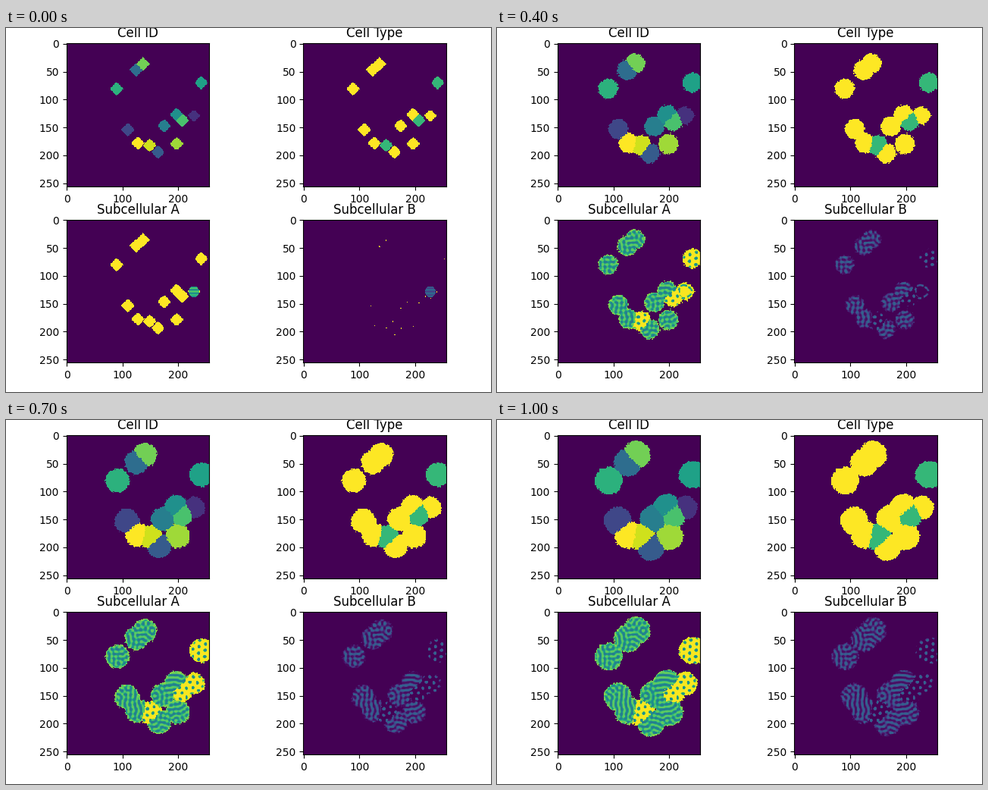
A matplotlib script that plays this animation: 640x480 px, repeating every 1100 ms.

```python
import numpy as np
import matplotlib.pyplot as plt
from matplotlib.animation import FuncAnimation

N = 256
STEPS = 11

# start x, start y, end x, end y; row order gives the cell id
CELLS = np.array([
    (227, 129, 228, 129), (109, 154, 107, 152.5), (163, 194, 166, 199),
    (124, 47, 125, 48.5), (174, 147, 171, 150), (196, 127, 195, 129),
    (240, 70, 241, 70), (89, 81, 91, 80.5), (206, 137, 205, 141),
    (136, 37, 140.5, 34), (196, 179, 199.5, 180), (148, 182, 150, 182),
    (127, 178, 125, 177)])
GREEN_TYPE = (7, 9, 12)
SPOTTED = (1,) + GREEN_TYPE

yy, xx = np.mgrid[:N, :N].astype(float)


def ring_filter(wave):
    freq = np.hypot(np.fft.fftfreq(N)[:, None], np.fft.fftfreq(N)[None, :])
    return np.exp(-((freq * wave - 1) / 0.24) ** 2)


MAZE, DOTS = ring_filter(8.5), ring_filter(10.5)


def band(u, ring):
    """Keep one wavelength and scale to unit deviation."""
    v = np.fft.ifft2(np.fft.fft2(u) * ring).real
    return v / v.std()


def relax(u, ring, bias, rounds):
    for _ in range(rounds):
        u = np.tanh(2 * (band(u, ring) - bias))
    return u


def soft_noise(rng):
    n = rng.standard_normal((N, N))
    n = n + np.roll(n, 1, 0) + np.roll(n, -1, 0)
    return (n + np.roll(n, 1, 1) + np.roll(n, -1, 1)) / 9


def radii(k):
    r = np.full(len(CELLS), np.sqrt(138 + 47.5 * k))
    r[0] = np.sqrt(115 + 35 * k)
    return r


def grow(k):
    """Cell id map and depth below the outer edge at step k."""
    rng = np.random.default_rng(40 + k)
    amp = 0.8 if k == 0 else 2.5
    gx, gy = xx + amp * soft_noise(rng), yy + amp * soft_noise(rng)
    power = 2 - 0.88 / (k + 1) ** 1.3
    centres = CELLS[:, :2] + (CELLS[:, 2:] - CELLS[:, :2]) * k / (STEPS - 1)
    r = radii(k)
    gap = np.array([
        (abs(gx - cx) ** power + abs(gy - cy) ** power) ** (2 / power) - ri ** 2
        for (cx, cy), ri in zip(centres, r)])
    owner = gap.argmin(0)
    low = gap.min(0)
    ids = np.where(low < 0, owner + 1, 0)
    return ids, -low / (2 * r[owner])


def seed_maze(rng):
    """Noise with a small four-petal flower at each cell's start."""
    u = rng.standard_normal((N, N))
    for x, y, *_ in CELLS:
        dx, dy = xx - x, yy - y
        petals = np.cos(2 * np.pi * dx / 9) + np.cos(2 * np.pi * dy / 9)
        u -= 0.5 * petals * np.exp(-(dx ** 2 + dy ** 2) / 80)
    return u


def broken_ring(k):
    dx, dy = xx - CELLS[0, 0], yy - CELLS[0, 1]
    d, a = np.hypot(dx, dy), np.arctan2(dy, dx)
    ring = np.exp(-((d - 0.72 * radii(k)[0] - np.cos(3 * a)) / 1.6) ** 2)
    return ring * (np.cos(5 * a + 0.6 * k) > -0.7)


def first_step(ids):
    a = np.where(ids > 0, 1.0, 0.0)
    b = np.zeros((N, N))
    for x, y in CELLS[:, :2].astype(int):
        b[y:y + 2, x + 12] = b[y + 12, x:x + 2] = 1
    x, y = CELLS[0, :2]
    disc = np.hypot(xx - x, yy - y) < 9.5
    wave = np.cos(2 * np.pi * (yy - y) / 6)
    a[disc] = (0.6 + 0.14 * wave)[disc]
    b[disc] = (0.28 - 0.08 * wave)[disc]
    return a, b


def later_step(k, ids, depth, maze, dots):
    stripe = np.clip(0.47 + 0.5 * band(maze, MAZE), 0, 1) * min(1, 0.4 + 0.3 * k)
    spot = np.clip((band(dots, DOTS) - 0.5) / 1.1, 0, 1)
    w = np.clip((k - 4) / 3, 0, 1)
    spot = np.where(ids == 1, (1 - w) * broken_ring(k) + w * spot, spot)
    rim = np.clip(depth / 3.5, 0, 1)
    spotted = np.isin(ids, SPOTTED)
    inner = np.where(spotted, 0.99 - 0.52 * spot, 0.75 - 0.33 * stripe)
    edge = np.where(spotted, 0.95, 0.84)
    a = inner * rim + edge * (1 - rim)
    b = np.where(spotted, 0.32 * spot, 0.04 + 0.27 * stripe) * rim
    return a * (ids > 0), b * (ids > 0)


def build():
    rng = np.random.default_rng(7)
    maze = relax(seed_maze(rng), MAZE, 0, 1)
    dots = relax(rng.standard_normal((N, N)), DOTS, 0.7, 6)
    out = []
    for k in range(STEPS):
        ids, depth = grow(k)
        kind = np.where(np.isin(ids, GREEN_TYPE), 2, 3) * (ids > 0)
        if k == 0:
            a, b = first_step(ids)
        else:
            a, b = later_step(k, ids, depth, maze, dots)
            maze = relax(maze, MAZE, 0, 1)
            dots = relax(dots, DOTS, 0.7, 1)
        out.append((ids + (ids > 0), kind, a, b))
    return out


STATES = build()

# spacing is settled on the empty axes, before images and titles
fig, axes = plt.subplots(2, 2, figsize=(6.4, 4.8), dpi=100)
fig.tight_layout()

PANELS = [("Cell ID", len(CELLS) + 1), ("Cell Type", 3),
          ("Subcellular A", 1), ("Subcellular B", 1)]
images = []
for ax, (title, vmax), data in zip(axes.flat, PANELS, STATES[0]):
    images.append(ax.imshow(data, cmap="viridis", vmin=0, vmax=vmax,
                            interpolation="nearest"))
    ax.set_title(title)


def update(k):
    for im, data in zip(images, STATES[k]):
        im.set_data(data)
    return images


anim = FuncAnimation(fig, update, frames=STEPS, interval=100,
                     repeat=True, repeat_delay=0, blit=False)
plt.show()
```
